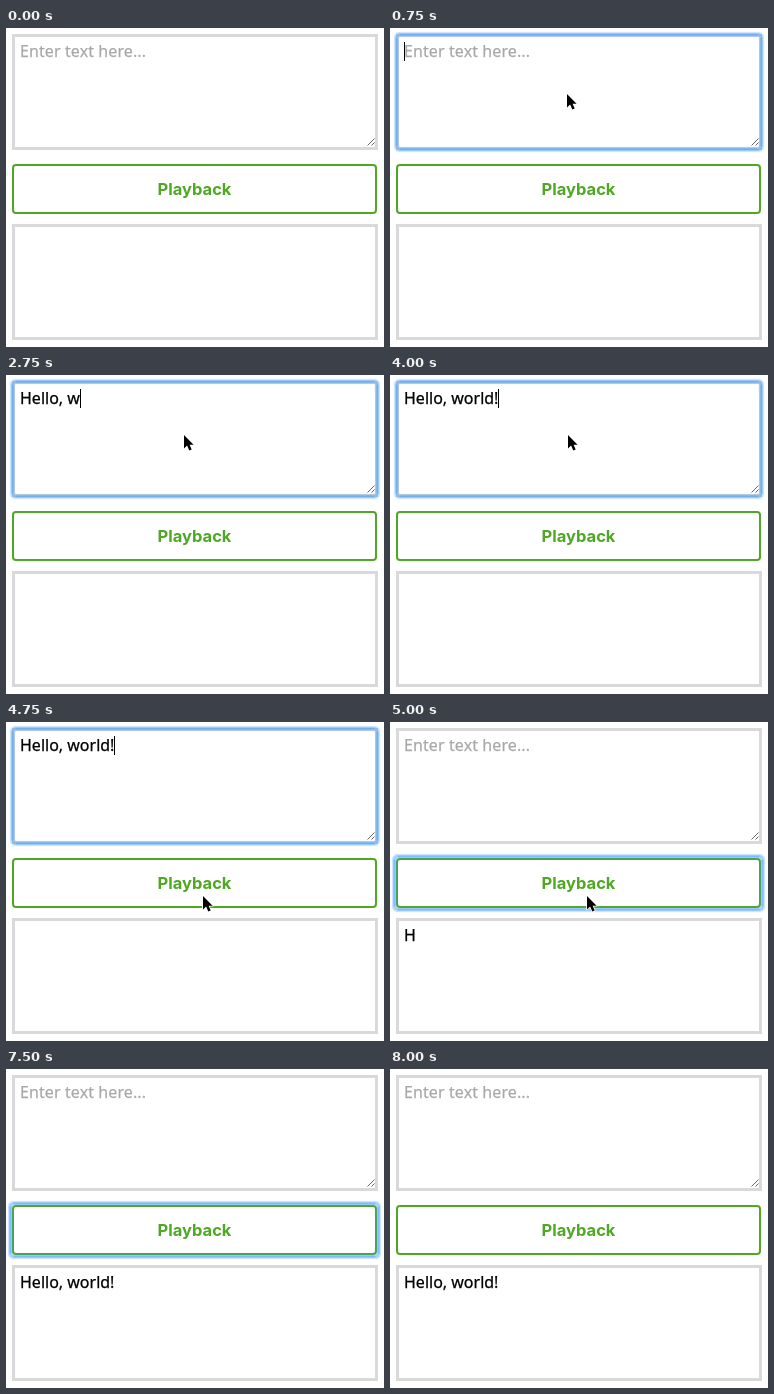
An HTML page for the animation above (8.25 s loop, 378 px wide and 319 px high).

```html
<!DOCTYPE html>
<html lang="en">
<head>
<meta charset="utf-8">
<title>Typing playback</title>
<style>
  html, body { margin: 0; width: 100%; height: 100%; overflow: hidden; background: #fff; }
  svg { display: block; width: 378px; height: 319px; }
  text { font: 16px "Noto Sans", "Open Sans", sans-serif; white-space: pre; stroke: #000; stroke-width: .25px; }
  .box { fill: #fff; stroke: #d9d9d9; stroke-width: 3; }
  .ring { fill: none; stroke: #3b99fc; }
  #hint { fill: #a9a9a9; stroke: #a9a9a9; letter-spacing: .1px; }
  #label { font: 700 16.5px Inter, "Open Sans", sans-serif; fill: #4fa824; stroke: none; text-anchor: middle; }
</style>
</head>
<body>
<svg viewBox="0 0 378 319">
  <rect width="378" height="319" fill="#fff"/>
  <rect class="box" x="7.5" y="7.5" width="363" height="113"/>
  <g id="inputRing" class="ring"></g>
  <path d="M361.5 117.5 368.5 110.5M365.5 117.5 368.5 114.5" fill="none" stroke="#666"/>
  <text id="hint" x="14" y="29">Enter text here...</text>
  <text id="typed" x="14" y="29"></text>
  <rect id="caret" y="14" width="1" height="19"/>

  <rect x="7" y="137" width="363" height="48" rx="3" fill="#fff" stroke="#4fa824" stroke-width="2"/>
  <g id="buttonRing" class="ring"></g>
  <text id="label" x="188.5" y="167">Playback</text>

  <rect class="box" x="7.5" y="197.5" width="363" height="113"/>
  <text id="replayed" x="14" y="219"></text>

  <path id="pointer" d="M0 0V13.4L3.1 10.6 5.3 15.6 7.7 14.6 5.6 9.7H9.6Z" stroke="#fff" stroke-width="1.6" paint-order="stroke" stroke-linejoin="round"/>
</svg>
<script>
const LOOP = 8250, STEP = 250;
const ENTER = 250, FOCUS = 750, CLICK = 5000, BLUR = 8000;
const MESSAGE = "Hello, world!";
const RING_WIDTH = 7;
const el = id => document.getElementById(id);
const clamp01 = v => Math.min(1, Math.max(0, v));
const mix = (a, b, p) => a + (b - a) * p;

// A steady burst, a short pause inside "world", then the closing mark.
function textAt(t, start, resume, end) {
  let length = 0;
  if (t >= end) length = 13;
  else if (t >= resume) length = Math.min(12, 11 + Math.floor((t - resume) / STEP));
  else if (t >= start) length = Math.min(9, 1 + Math.floor((t - start) * .006));
  return MESSAGE.slice(0, length);
}

// Glide in with a soft stop, rest, then go straight down to the button.
function pointerAt(t) {
  const arrive = 1 - (1 - clamp01((t - ENTER) / 1000)) ** 3.5;
  const leave = clamp01((t - 4250) / 500);
  return [
    mix(mix(168, 178, arrive), 197, leave),
    mix(mix(128, 60, arrive), 174, leave)
  ].map(Math.round);
}

// Nested one-pixel outlines that fade out on both sides.
function drawRing(id, x, y, width, height) {
  for (let i = 0; i < RING_WIDTH; i++) {
    const d = i + .5;
    const opacity = .65 * Math.sin(Math.PI * d / RING_WIDTH) ** 2;
    el(id).insertAdjacentHTML("beforeend",
      `<rect x="${x + d}" y="${y + d}" width="${width - 2 * d}" height="${height - 2 * d}" rx="${5 - i * .6}" opacity="${opacity}"/>`);
  }
}

function show(id, visible) {
  el(id).setAttribute("visibility", visible ? "visible" : "hidden");
}

function render(now) {
  const t = Math.floor((now % LOOP) / STEP) * STEP;
  const inputFocused = t >= FOCUS && t < CLICK;
  const typed = inputFocused ? textAt(t, 1500, 3250, 4000) : "";

  el("typed").textContent = typed;
  el("replayed").textContent = textAt(t, CLICK, 7000, 7500);
  show("hint", !typed);
  show("inputRing", inputFocused);
  show("buttonRing", t >= CLICK && t < BLUR);

  const textWidth = typed ? el("typed").getComputedTextLength() : 0;
  el("caret").setAttribute("x", Math.round(14 + textWidth));
  show("caret", inputFocused);

  el("pointer").setAttribute("transform", `translate(${pointerAt(t)})`);
  show("pointer", t >= ENTER && t <= CLICK);
}

drawRing("inputRing", 3, 3, 372, 122);
drawRing("buttonRing", 1, 131, 375, 60);

const start = performance.now();
function tick() {
  render(performance.now() - start);
  requestAnimationFrame(tick);
}
tick();
</script>
</body>
</html>
```
